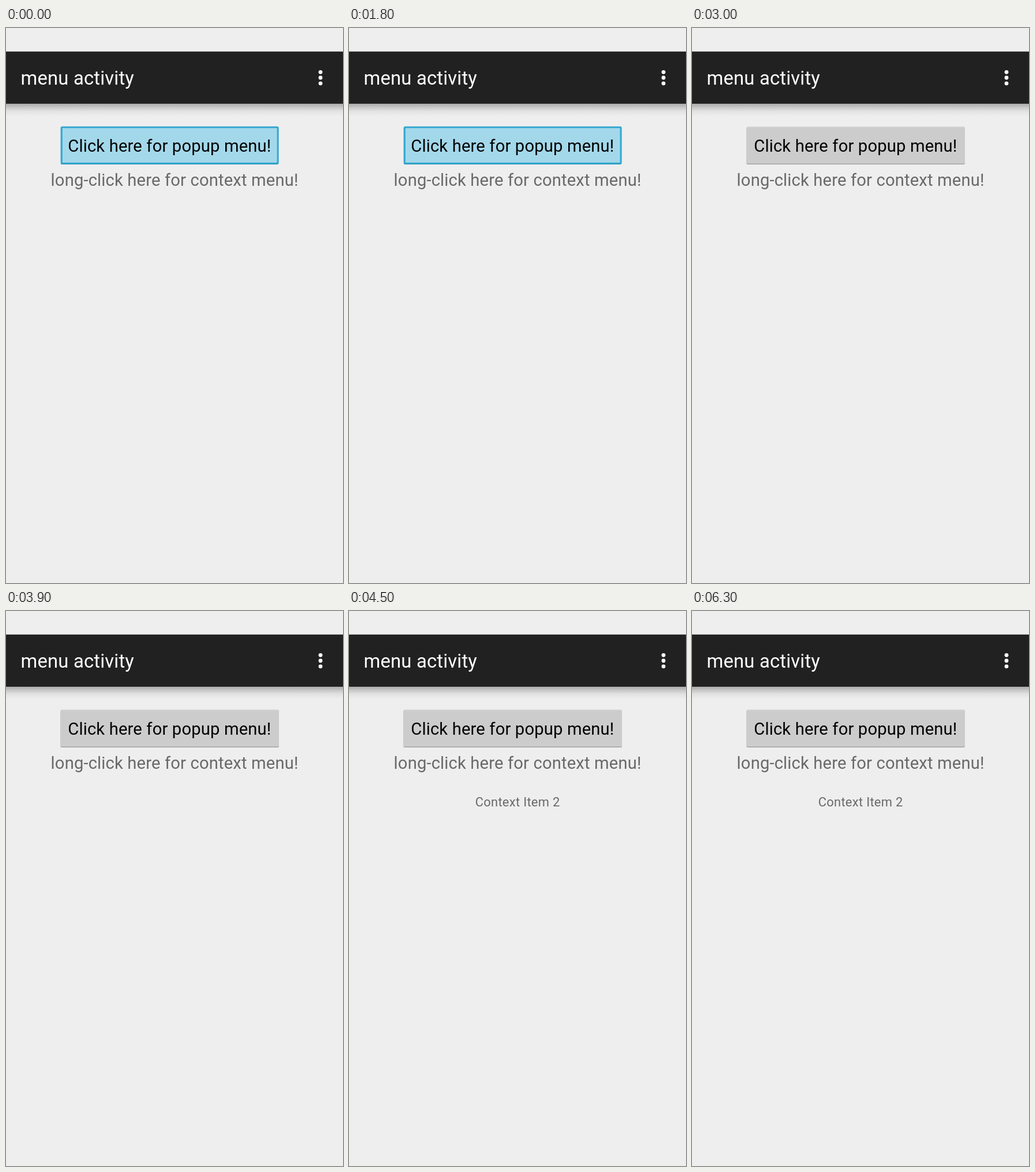
Recreate the animation shown at these times as an HTML page. Size 584 by 960 pixels, loop 7.5 s.

```html
<!DOCTYPE html>
<html lang="en">
<head>
<meta charset="utf-8">
<title>Menu activity</title>
<style>
  html, body { margin: 0; width: 584px; height: 960px; overflow: hidden; background: #eee; }
  svg { display: block; }
  text { font: 29.2px Roboto, sans-serif; letter-spacing: .15px; fill: #696969; }
  .title { font-size: 32.85px; fill: #fff; }
  .label { fill: #000; }
  .small { font-size: 21.9px; letter-spacing: .3px; }
</style>
</head>
<body>
<svg width="584" height="960" viewBox="0 0 584 960">
  <defs>
    <linearGradient id="shadow" x2="0" y2="1">
      <stop stop-color="#aaa"/>
      <stop offset=".25" stop-color="#c4c4c4"/>
      <stop offset=".6" stop-color="#e2e2e2"/>
      <stop offset="1" stop-color="#eee"/>
    </linearGradient>
  </defs>

  <rect y="40.7" width="584" height="90.5" fill="#212121"/>
  <rect y="131.2" width="584" height="21" fill="url(#shadow)"/>
  <text class="title" x="25.6" y="98">menu activity</text>
  <g fill="#fff">
    <circle cx="545" cy="76.3" r="3.4"/>
    <circle cx="545" cy="86" r="3.4"/>
    <circle cx="545" cy="95.8" r="3.4"/>
  </g>

  <g id="pressed">
    <rect x="94.8" y="170.5" width="377.6" height="65.5" rx="2" fill="#2d94b8"/>
    <rect x="94.8" y="170.5" width="377.6" height="64.3" rx="2" fill="#33a9d2"/>
    <rect x="97.8" y="173.2" width="371.8" height="59.6" fill="#a3d8ea"/>
  </g>
  <g id="idle">
    <rect x="94.5" y="172" width="378.5" height="63.8" rx="2" fill="#868686"/>
    <rect x="94.5" y="170.5" width="378.5" height="64" rx="2" fill="#d6d6d6"/>
    <rect x="94.5" y="171.7" width="378.5" height="62.8" rx="1.5" fill="#ccc"/>
  </g>
  <text class="label" x="107.3" y="214">Click here for popup menu!</text>
  <text x="77.6" y="273">long-click here for context menu!</text>
  <text class="small" id="choice" x="218.7" y="338">Context Item 2</text>
</svg>
<script>
  const LOOP = 7500, RELEASE = 3000, CHOOSE = 4500;
  const start = performance.now();

  function show(id, visible) {
    document.getElementById(id).style.visibility = visible ? "visible" : "hidden";
  }

  function draw() {
    const t = (performance.now() - start) % LOOP;
    show("pressed", t < RELEASE);
    show("idle", t >= RELEASE);
    show("choice", t >= CHOOSE);
    requestAnimationFrame(draw);
  }
  draw();
</script>
</body>
</html>
```
